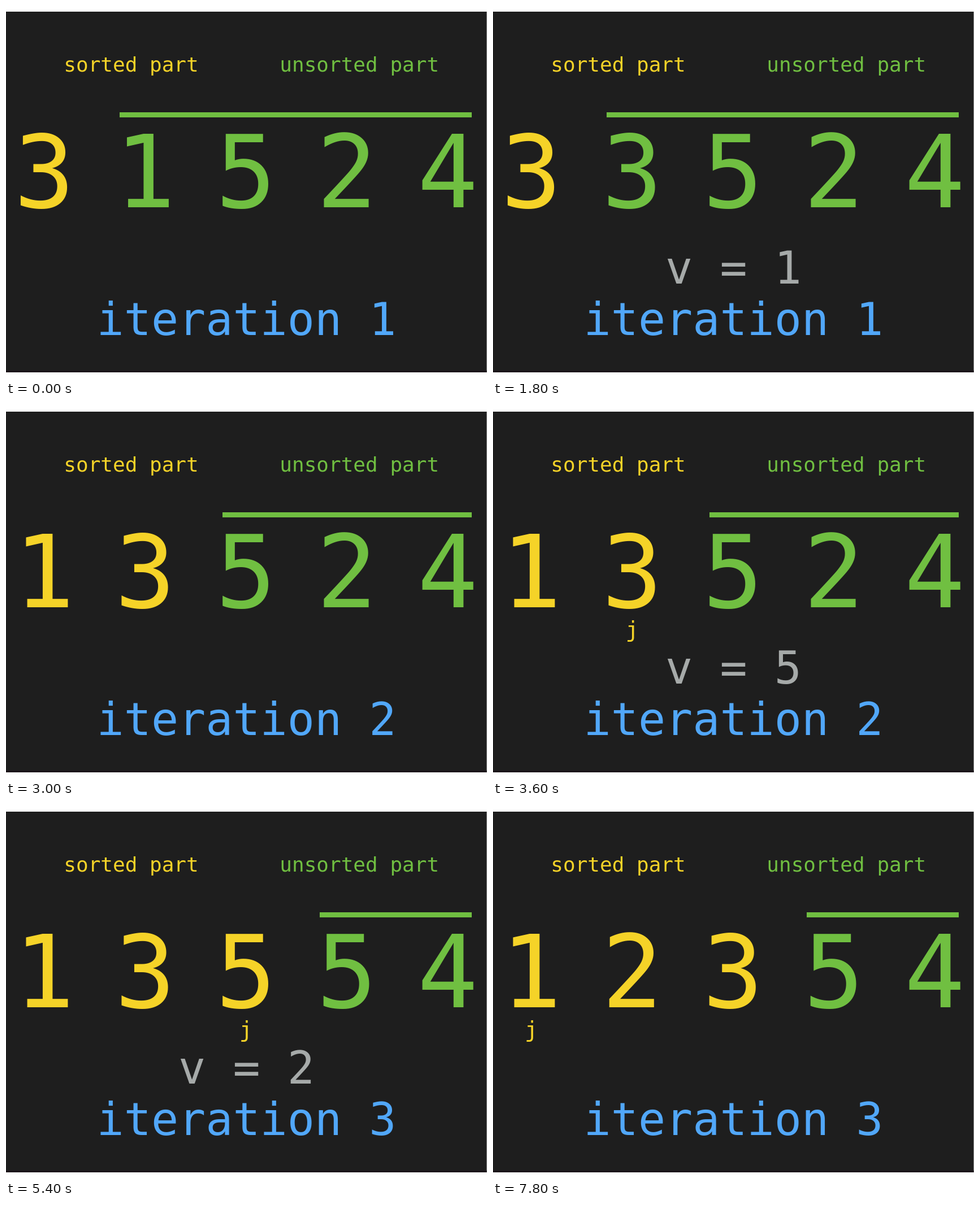
These frames come from a looping animation (851 px wide and 658 px high, 8 s). An HTML page:

```html
<!DOCTYPE html>
<html lang="en">
<head>
<meta charset="utf-8">
<title>Insertion sort</title>
<style>
  html, body { margin: 0; width: 100%; height: 100%; overflow: hidden; background: #fff; }
  svg { display: block; width: 851px; height: 658px; }
  text { font-family: "DejaVu Sans Mono", monospace; text-anchor: middle; }
  .sorted { fill: #f5d328; }
  .unsorted { fill: #70bf41; }
  .label { font-size: 36px; }
  .digit { font-size: 178.6px; }
  .line { font-size: 80px; }
  #j { font-size: 39px; }
  #v { fill: #a6aaa9; }
  #iteration { fill: #51a7f9; }
</style>
</head>
<body>
<svg viewBox="0 0 851 658">
  <rect y="10" width="850.5" height="638" fill="#1e1e1e"/>
  <rect y="644.5" width="850.5" height="3.5" fill="#1c161a"/>
  <text class="label sorted" x="221.5" y="116.3">sorted part</text>
  <text class="label unsorted" x="625.2" y="116.3">unsorted part</text>
  <rect id="bar" class="unsorted" y="188" height="9"/>
  <g id="digits"></g>
  <text id="j" class="sorted" y="409.3">j</text>
  <text id="v" class="line" x="425.5" y="491"></text>
  <text id="iteration" class="line" x="425.5" y="582.2"></text>
</svg>
<script>
const LOOP = 8000, STEP = 600, BAR_END = 824;
const barStart = [0, 201, 383, 555];

// [digits, iteration, v, j]; null hides the part
const steps = [
  ['31524', 1, null, null],
  ['31524', 1, 1, 0],
  ['33524', 1, 1, 0],
  ['33524', 1, 1, null],
  ['13524', 1, null, null],
  ['13524', 2, null, null],
  ['13524', 2, 5, 1],
  ['13524', 3, null, null],
  ['13524', 3, 2, 2],
  ['13554', 3, 2, 2],
  ['13554', 3, 2, 1],
  ['13354', 3, 2, 1],
  ['13354', 3, 2, 0],
  ['12354', 3, null, 0]
];

const $ = id => document.getElementById(id);
const columnX = i => 67.8 + 178.4 * i;

const cells = Array.from({ length: 5 }, (_, i) => {
  const cell = document.createElementNS('http://www.w3.org/2000/svg', 'text');
  cell.setAttribute('x', columnX(i));
  cell.setAttribute('y', 355.5);
  return $('digits').appendChild(cell);
});

function show([digits, iteration, v, j]) {
  cells.forEach((cell, i) => {
    cell.textContent = digits[i];
    cell.setAttribute('class', 'digit ' + (i < iteration ? 'sorted' : 'unsorted'));
  });
  $('bar').setAttribute('x', barStart[iteration]);
  $('bar').setAttribute('width', BAR_END - barStart[iteration]);
  $('iteration').textContent = `iteration ${iteration}`;
  $('v').textContent = v === null ? '' : `v = ${v}`;
  $('j').style.display = j === null ? 'none' : '';
  if (j !== null) $('j').setAttribute('x', columnX(j));
}

const start = performance.now();
let current = -1;

function tick() {
  const time = (performance.now() - start) % LOOP;
  const index = Math.floor(time / STEP);
  if (index !== current) show(steps[current = index]);
  requestAnimationFrame(tick);
}
tick();
</script>
</body>
</html>
```
